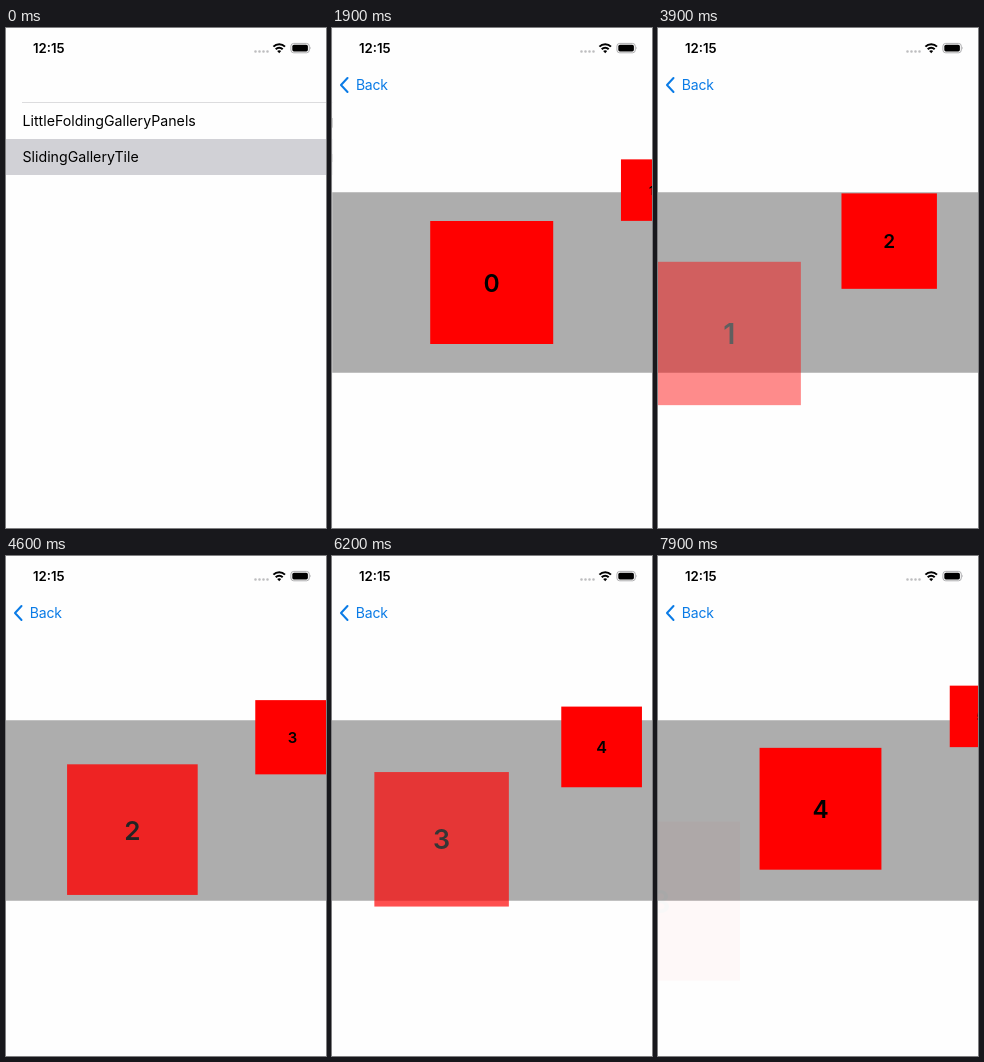
Write an HTML page that moves like this. It is 320 by 500 pixels and loops after 8 s.

```html
<!DOCTYPE html>
<html lang="en">
<head>
<meta charset="utf-8">
<title>Sliding cards</title>
<style>
  html, body { margin: 0; width: 100%; height: 100%; overflow: hidden; background: #fefefe; }
  svg { display: block; width: 320px; height: 500px; font-family: Inter, Roboto, sans-serif; }
  .row { font-size: 14.2px; }
  .clock { font-size: 13.2px; font-weight: 600; }
  .digit { font-size: 24.6px; font-weight: 600; text-anchor: middle; }
  .back { font-size: 14px; letter-spacing: -.2px; fill: #0a7be6; }
</style>
</head>
<body>
<svg viewBox="0 0 320 500">
  <g id="list">
    <rect width="320" height="500" fill="#fefefe"/>
    <path d="M16 74.5H320" stroke="#dcdcde"/>
    <rect y="111" width="320" height="36" fill="#d1d1d6"/>
    <text class="row" x="16.5" y="98">LittleFoldingGalleryPanels</text>
    <text class="row" x="16.5" y="134">SlidingGalleryTile</text>
  </g>
  <rect id="dim" width="320" height="500"/>
  <g id="detail">
    <rect width="320" height="500" fill="#fefefe"/>
    <rect y="164.25" width="320" height="180.5" fill="#adadad"/>
    <g id="cards"></g>
  </g>
  <g id="nav">
    <path d="M15.5 50L9 57L15.5 64" fill="none" stroke="#0a7be6" stroke-width="2" stroke-linecap="round" stroke-linejoin="round"/>
    <text id="back" class="back" x="23.8" y="62">Back</text>
  </g>
  <g id="status">
    <text class="clock" x="27" y="25">12:15</text>
    <path d="M249.5 23.5h12.1" stroke="#bdbdbf" stroke-width="2.6" stroke-linecap="round" stroke-dasharray="0 4"/>
    <g fill="none" stroke="#000" stroke-width="2">
      <path d="M267.4 18.6a8.2 8.2 0 0 1 11.6 0"/>
      <path d="M269.7 21.3a5 5 0 0 1 7 0"/>
    </g>
    <path d="M273.2 25.2l-2-2.1a2.9 2.9 0 0 1 4 0z"/>
    <rect x="284.9" y="15.4" width="18.4" height="9.4" rx="2.8" fill="none" stroke="#a5a5a7" stroke-width=".9"/>
    <rect x="286.3" y="16.8" width="15.6" height="6.6" rx="1.6"/>
    <path d="M304.3 18.6q1.4 1.5 0 3z" fill="#a5a5a7"/>
  </g>
</svg>
<script>
const LOOP = 8000, STEP = 100;
const PITCH = 160, CARD = 123, CENTER = { x: 159.5, y: 254.5 };
const SLOPE = Math.tan(Math.PI / 6);

// "mid" is when a swipe is halfway: a slow drag before it, a fast settle after.
const swipes = [
  { start: 2700, mid: 2949, by: 1 },
  { start: 3600, mid: 3890, by: 1 },
  { start: 5300, mid: 5458, by: 1 },
  { start: 6200, mid: 6276, by: 1 },
  { start: 6900, mid: 7150, by: -1 },
  { start: 7600, mid: 7710, by: 1 }
];

const $ = id => document.getElementById(id);
const set = (el, attrs) => { for (const k in attrs) el.setAttribute(k, attrs[k]); };
const clamp = v => Math.max(0, Math.min(1, v));

// Critically damped spring from 0 to 1.
function pushAt(t) {
  if (t < 1300) return 0;
  const x = (t - 1270) / 65;
  return 1 - (1 + x) * Math.exp(-x);
}

function swipeAt(t, { start, mid, by }) {
  if (t < start) return 0;
  const tau = t < mid ? 96 : 48;
  return by / (1 + Math.exp((mid - t) / tau));
}

// A short pull that is let go and falls back to the same card.
const tugAt = t => t < 4600 ? 0 : .255 * Math.exp(-(((t - 4690) / 197) ** 2));

const pageAt = t => swipes.reduce((sum, swipe) => sum + swipeAt(t, swipe), tugAt(t));

const cards = Array.from({ length: 6 }, (_, i) => {
  const g = document.createElementNS('http://www.w3.org/2000/svg', 'g');
  g.innerHTML = `<rect x="${-CARD / 2}" y="${-CARD / 2}" width="${CARD}" height="${CARD}" fill="#f00"/>
    <text class="digit" y="9.3">${i}</text>`;
  $('cards').append(g);
  return g;
});

// Cards travel down a 30 degree slope, growing and fading left of centre.
function placeCard(card, offset) {
  const dx = offset * PITCH;
  const scale = offset < 0 ? 1 - .3 * offset : Math.max(.5, 1 - .5 * offset);
  set(card, {
    transform: `translate(${CENTER.x + dx} ${CENTER.y - dx * SLOPE}) scale(${scale})`,
    opacity: clamp(1 + offset)
  });
}

function draw(now) {
  const t = Math.floor(now % LOOP / STEP) * STEP;
  const shown = pushAt(t), page = pageAt(t);
  set($('list'), { transform: `translate(${-96 * shown})` });
  set($('dim'), { opacity: .1 * shown });
  set($('detail'), { transform: `translate(${320 * (1 - shown)})` });
  set($('nav'), { opacity: shown });
  set($('back'), { transform: `translate(${120 * (1 - shown)})` });
  cards.forEach((card, i) => placeCard(card, i - page));
}

const origin = performance.now();
function tick() {
  draw(performance.now() - origin);
  requestAnimationFrame(tick);
}
tick();
</script>
</body>
</html>
```
